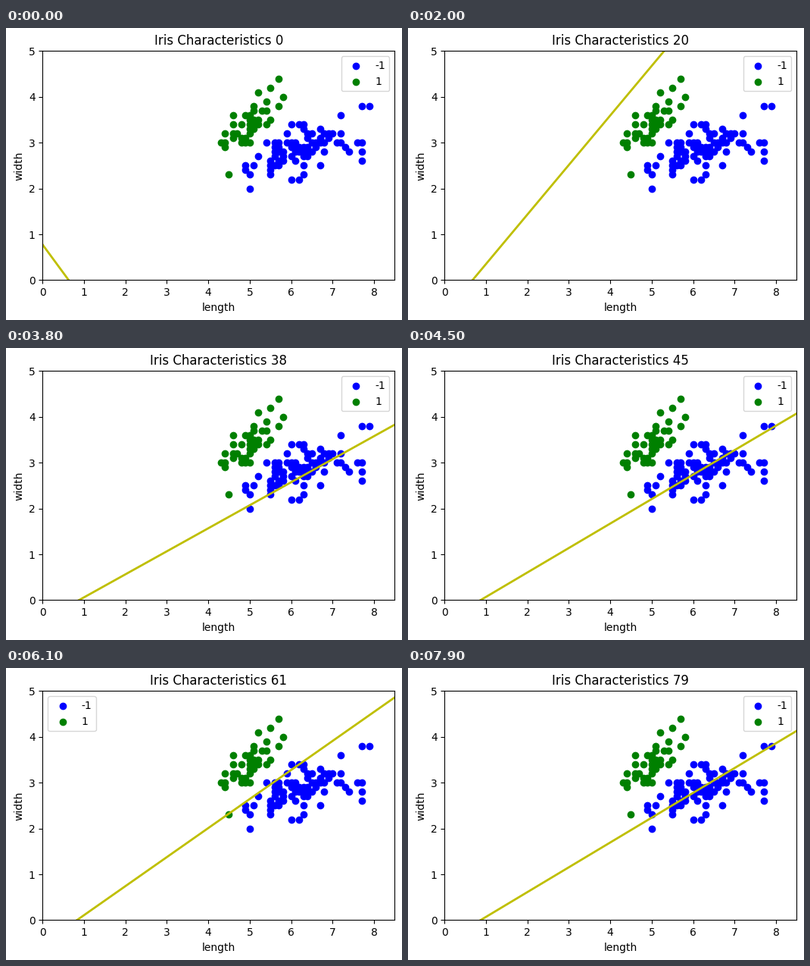
Animation, 523 px wide and 385 px high, one loop 8000 ms. Source, as a matplotlib script:

```python
import numpy as np
import matplotlib.pyplot as plt
from matplotlib.animation import FuncAnimation

W, H, DPI = 523, 385, 100
FRAMES, INTERVAL = 80, 100

# width -> lengths
OTHERS = {
    2.0: [5.0],
    2.2: [6.0, 6.2],
    2.3: [5.0, 5.5, 6.3],
    2.4: [4.9, 5.5],
    2.5: [4.9, 5.1, 5.5, 5.6, 5.7, 6.3, 6.7],
    2.6: [5.5, 5.7, 5.8, 6.1, 7.7],
    2.7: [5.2, 5.6, 5.8, 6.0, 6.3, 6.4],
    2.8: [5.6, 5.7, 5.8, 6.1, 6.2, 6.3, 6.4, 6.5, 6.8, 7.4, 7.7],
    2.9: [5.6, 5.7, 6.0, 6.1, 6.2, 6.3, 6.4, 6.6, 7.3],
    3.0: [5.4, 5.6, 5.7, 5.9, 6.0, 6.1, 6.5, 6.6, 6.7, 6.8, 7.1, 7.2, 7.6, 7.7],
    3.1: [6.4, 6.7, 6.9],
    3.2: [5.9, 6.4, 6.5, 6.8, 6.9, 7.0, 7.2],
    3.3: [6.3, 6.7],
    3.4: [6.0, 6.2, 6.3],
    3.6: [7.2],
    3.8: [7.7, 7.9],
}
SETOSA = {
    2.3: [4.5],
    2.9: [4.4],
    3.0: [4.3, 4.4, 4.8, 4.9, 5.0],
    3.1: [4.6, 4.8, 4.9],
    3.2: [4.4, 4.6, 4.7, 5.0],
    3.3: [5.0, 5.1],
    3.4: [4.6, 4.8, 5.0, 5.1, 5.2, 5.4],
    3.5: [5.0, 5.1, 5.2, 5.5],
    3.6: [4.6, 4.9, 5.0],
    3.7: [5.1, 5.3, 5.4],
    3.8: [5.1, 5.7],
    3.9: [5.4],
    4.0: [5.8],
    4.1: [5.2],
    4.2: [5.5],
    4.4: [5.7],
}

# Decision boundary x = x0 + tilt * y, as it swings during training
STEPS = [0, 20, 38, 51, 61, 72, 79]
X0 = [0.63, 0.675, 0.88, 0.86, 0.83, 0.77, 0.87]
TILT = [-0.813, 0.925, 1.99, 1.773, 1.578, 1.234, 1.847]


def scatter(ax, rows, color, label):
    pts = np.array([(x, y) for y, xs in rows.items() for x in xs])
    ax.scatter(pts[:, 0], pts[:, 1], color=color, label=label)


fig = plt.figure(figsize=(W / DPI, H / DPI), dpi=DPI, facecolor="white")
ax = fig.add_axes([48.3 / W, 52.6 / H, 465 / W, 302 / H])
scatter(ax, OTHERS, "blue", "-1")
scatter(ax, SETOSA, "green", "1")
ax.set(xlim=(0, 8.5), ylim=(0, 5), xlabel="length", ylabel="width")
ax.set_xticks(range(9))
ax.set_yticks(range(6))
title = ax.set_title("")
ys = np.array([-1.0, 6.0])
line, = ax.plot(ys, ys, color="y", lw=2, scalex=False, scaley=False)
ax.legend(loc="best")  # hops left whenever the line crosses the right corner


def update(i):
    x0 = np.interp(i, STEPS, X0)
    tilt = np.interp(i, STEPS, TILT)
    line.set_data(x0 + tilt * ys, ys)
    title.set_text(f"Iris Characteristics {i}")
    return line, title


anim = FuncAnimation(fig, update, frames=FRAMES, interval=INTERVAL,
                     repeat=True, repeat_delay=0, blit=False)
plt.show()
```
